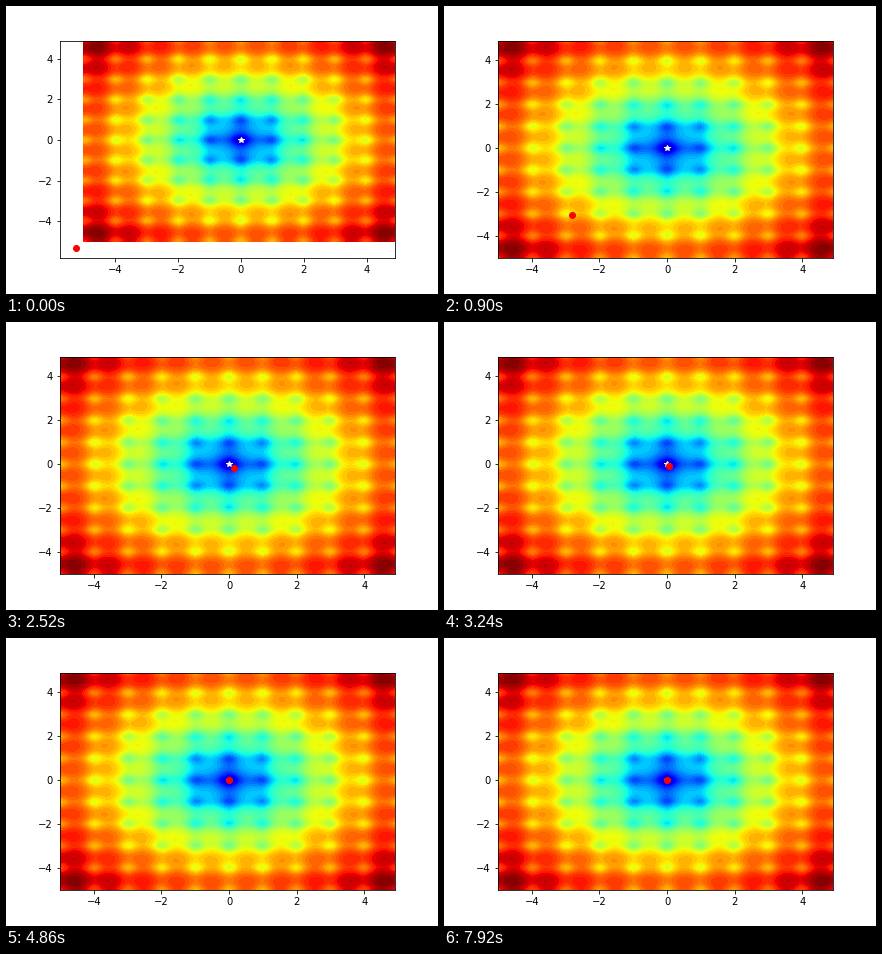
These frames come from a looping animation (432 by 288 pixels, 8 s). A matplotlib script:

```python
import numpy as np
import matplotlib.pyplot as plt
from matplotlib.animation import FuncAnimation

W, H, DPI = 432, 288, 72
LOOP, TICK, STEP = 8000, 20, 180   # ms: loop, frame interval, search step

plt.rcParams.update({"font.family": "DejaVu Sans", "font.size": 10})


def ackley(x, y):
    radial = -20 * np.exp(-0.2 * np.sqrt((x * x + y * y) / 2))
    ripple = -np.exp((np.cos(2 * np.pi * x) + np.cos(2 * np.pi * y)) / 2)
    return radial + ripple + 20 + np.e


axis = np.arange(-5, 5, 0.1)
LOW, HIGH = axis[0], axis[-1]

START = np.array([-5.25, -5.31])
CORNER = np.array([-4.98, -4.98])  # local minimum reached after one step
NEAR = np.array([0.23, -0.28])     # entry into the central basin
ARRIVE, SETTLE = 10, 27


def position(step):
    if step == 0:
        return START
    if step < ARRIVE:
        t = (step - 1) / (ARRIVE - 1)
        return CORNER + (NEAR - CORNER) * t * t * (3 - 2 * t)
    left = max(0, SETTLE - step) / (SETTLE - ARRIVE)
    return NEAR * left ** 2


def limits(value):
    """Widen the view by a 5% margin when the point lies outside the map."""
    if value >= LOW:
        return LOW, HIGH
    return value - 0.05 * (HIGH - value), HIGH


fig, ax = plt.subplots(figsize=(W / DPI, H / DPI), dpi=DPI, facecolor="white")
fig.subplots_adjust(left=0.125, right=0.9, bottom=0.125, top=0.88)

gx, gy = np.meshgrid(axis, axis)
ax.contourf(gx, gy, ackley(gx, gy), levels=50, cmap="jet")
ax.plot(0, 0, "*", color="white")
dot, = ax.plot([], [], "o", color="red")
ax.set_xticks(range(-4, 5, 2))
ax.set_yticks(range(-4, 5, 2))


def draw(frame):
    x, y = position(frame * TICK // STEP)
    dot.set_data([x], [y])
    ax.set_xlim(*limits(x))
    ax.set_ylim(*limits(y))
    return dot,


anim = FuncAnimation(fig, draw, frames=LOOP // TICK, interval=TICK,
                     init_func=lambda: draw(0), repeat=True, repeat_delay=0)
plt.show()
```
